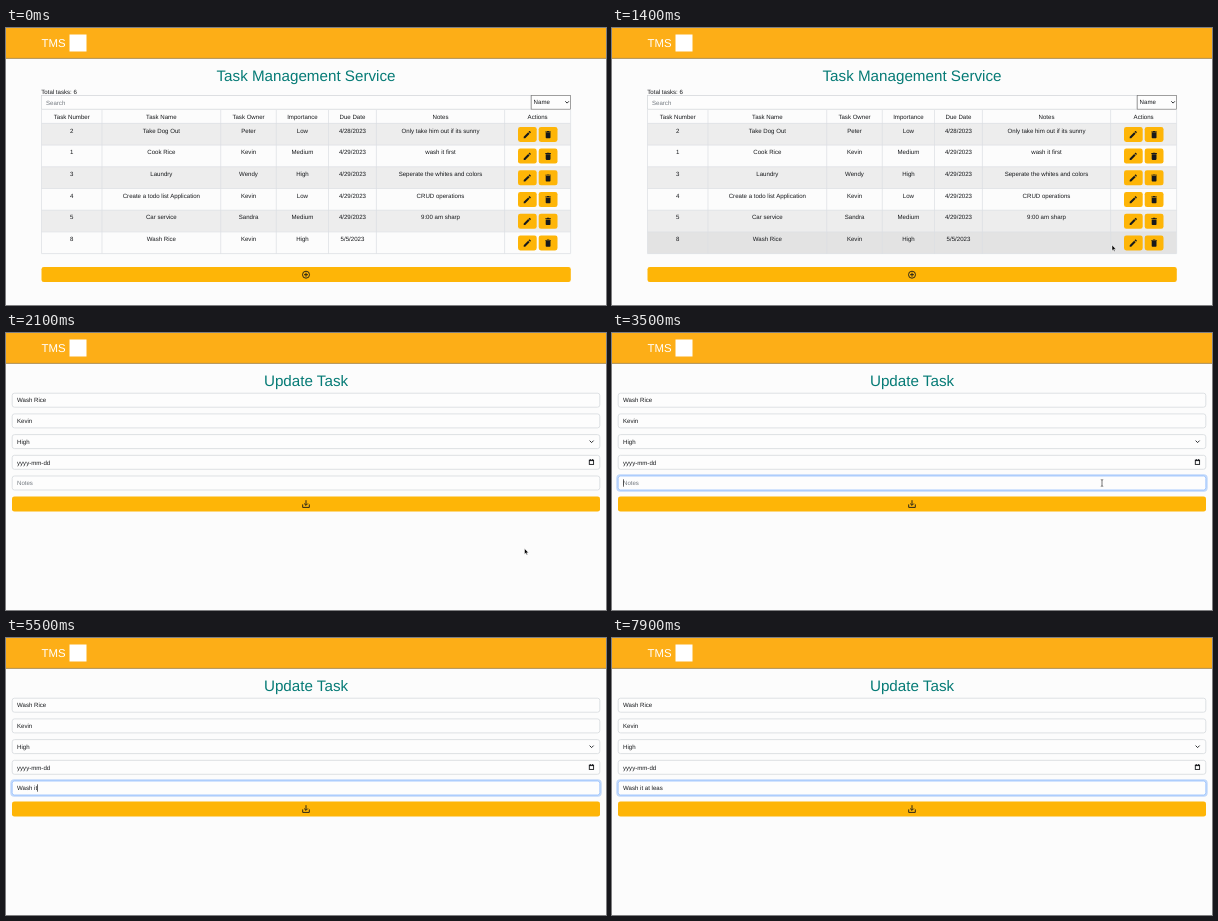
Animation of 600x277 px, one loop 8 s. Source, as an HTML page:

```html
<!DOCTYPE html>
<html lang="en">
<head>
<meta charset="utf-8">
<title>Task Management Service</title>
<style>
html, body { margin: 0; width: 100%; height: 100%; overflow: hidden; background: #fcfcfc; }
svg { display: block; }
text { font: 6.1px "Liberation Sans", Arial, sans-serif; fill: #17191c; white-space: pre; text-rendering: geometricPrecision; }
.mid { text-anchor: middle; }
.title { font-size: 15.2px; fill: #067b76; }
.brand { font-size: 11.4px; fill: #fff; }
.hint { fill: #747a80; }
.btn { fill: #feb507; }
.btn.hover { fill: #ffc832; }
.box { fill: #fdfdfd; stroke: #d0d4d8; stroke-width: .7; }
.line { fill: none; stroke: #17191c; stroke-width: .9; }
.grid { fill: none; stroke: #dcdfe2; stroke-width: .7; }
</style>
</head>
<body>
<svg id="stage" width="600" height="277" viewBox="0 0 600 277"></svg>
<script>
const LOOP = 8000, SUBMIT = 2100, FOCUS = 3300, HIDE = 4200, CARET_OFF = 7900;

const tasks = [
  [2, 'Take Dog Out', 'Peter', 'Low', '4/28/2023', 'Only take him out if its sunny'],
  [1, 'Cook Rice', 'Kevin', 'Medium', '4/29/2023', 'wash it first'],
  [3, 'Laundry', 'Wendy', 'High', '4/29/2023', 'Seperate the whites and colors'],
  [4, 'Create a todo list Application', 'Kevin', 'Low', '4/29/2023', 'CRUD operations'],
  [5, 'Car service', 'Sandra', 'Medium', '4/29/2023', '9:00 am sharp'],
  [8, 'Wash Rice', 'Kevin', 'High', '5/5/2023', '']
];
const heads = ['Task Number', 'Task Name', 'Task Owner', 'Importance', 'Due Date', 'Notes', 'Actions'];
const cols = [35.5, 96, 214.7, 270.3, 322.5, 370.4, 498.6, 564.6];
const TOP = 95.4, ROW = 21.7;

// [time, x, y] of the pointer tip
const path = [[400, 462, 236], [700, 475, 230], [800, 479.5, 225], [1200, 492, 219],
  [1600, 508, 215], [1900, 518.5, 215.5], [2600, 518.5, 215.5], [2800, 505, 185], [3000, 490, 150]];

// [time, contents of the notes field]
const typing = [[4300, 'W'], [4600, 'Wa'], [4700, 'Was'], [4800, 'Wash'], [5000, 'Wash '], [5200, 'Wash i'],
  [5400, 'Wash it'], [5700, 'Wash it '], [5800, 'Wash it a'], [6000, 'Wash it at'], [6200, 'Wash it at '],
  [6400, 'Wash it at l'], [6500, 'Wash it at le'], [6700, 'Wash it at lea'], [6900, 'Wash it at leas'],
  [7100, 'Wash it at least'], [7200, 'Wash it at least '], [7300, 'Wash it at least t'],
  [7500, 'Wash it at least'], [7600, 'Wash it at leas']];

const text = (x, y, s, cls = '', id = '') => `<text x="${x}" y="${y}" class="${cls}" id="${id}">${s}</text>`;
const rect = (x, y, w, h, cls, r = 0, id = '') =>
  `<rect x="${x}" y="${y}" width="${w}" height="${h}" rx="${r}" class="${cls}" id="${id}"/>`;
const line = d => `<path class="line" d="${d}"/>`;
const icon = (x, y, d) => `<path transform="translate(${x - 4.8} ${y - 4.8}) scale(.4)" fill="#17191c" d="${d}"/>`;
const pencil = 'M3 17.2V21h3.8L17.8 9.9 14.1 6.2zM20.7 7a1 1 0 0 0 0-1.4l-2.3-2.3a1 1 0 0 0-1.4 0l-1.9 1.8 3.8 3.8z';
const bin = 'M6 19a2 2 0 0 0 2 2h8a2 2 0 0 0 2-2V7H6zM19 4h-3.5l-1-1h-5l-1 1H5v2h14z';

function header() {
  return '<rect width="600" height="30" fill="#fdae17"/><rect y="29.9" width="600" height=".9" fill="#a9843f"/>' +
    text(35.5, 19.3, 'TMS', 'brand') + '<rect x="63.5" y="6.5" width="17" height="17" fill="#fff"/>';
}

function tableRow(task, i) {
  const y = TOP + i * ROW, last = i === tasks.length - 1;
  return `<rect id="${last ? 'lastRow' : ''}" x="35.5" y="${y}" width="529" height="${ROW}" fill="${i % 2 ? '#fcfcfc' : '#ededed'}"/>` +
    task.map((s, c) => text((cols[c] + cols[c + 1]) / 2, y + 9.1, s, 'mid')).join('') +
    rect(512, y + 3.5, 18.7, 15, 'btn', 2.3, last ? 'edit' : '') + icon(521.3, y + 11.2, pencil) +
    rect(532.7, y + 3.5, 18.8, 15, 'btn', 2.3) + icon(542.1, y + 11.2, bin);
}

function listPage() {
  const end = TOP + ROW * tasks.length;
  let grid = cols.map(x => `M${x} 82V${end}`).join('');
  for (let i = 0; i <= tasks.length; i++) grid += `M35.5 ${TOP + i * ROW}H564.6`;
  return text(300, 53.2, 'Task Management Service', 'title mid') + text(35.3, 66, 'Total tasks: 6') +
    rect(35.5, 67.4, 489.5, 13.8, 'box') + text(40, 76.6, 'Search', 'hint') +
    '<rect x="525.2" y="67.4" width="39.4" height="13.8" fill="#fdfdfd" stroke="#777" stroke-width=".7"/>' +
    text(527.6, 76.4, 'Name') + line('M559.3 73.3l1.8 1.8 1.8-1.8') +
    heads.map((s, c) => text((cols[c] + cols[c + 1]) / 2, 91, s, 'mid')).join('') +
    tasks.map(tableRow).join('') + `<path class="grid" d="${grid}"/>` +
    rect(35.5, 239, 529.3, 15, 'btn', 2.3) +
    '<circle class="line" cx="300" cy="246.7" r="3.5"/>' + line('M298 246.7h4M300 244.7v4');
}

function formPage() {
  const fields = ['Wash Rice', 'Kevin', 'High', 'yyyy-mm-dd', 'Notes'];
  return text(300, 53.2, 'Update Task', 'title mid') +
    '<rect id="ring" x="5.2" y="142.2" width="589.6" height="15.6" rx="3" fill="none" stroke="#c2d9fb" stroke-width="1.8"/>' +
    fields.map((s, i) => rect(6.2, 60.2 + i * 20.7, 587.6, 14, 'box', 2.3, i === 4 ? 'notesBox' : '') +
      text(11, 69.4 + i * 20.7, s, i === 4 ? 'hint' : '', i === 4 ? 'notes' : '')).join('') +
    line('M583.6 107.6l2 2 2-2') +
    '<rect class="line" x="583.3" y="127.2" width="4.3" height="4.2"/>' + line('M583 127.6h5M584.3 126v1.5M586.6 126v1.5') +
    rect(6, 163.5, 588, 15, 'btn', 2.3, 'save') +
    line('M300 167.2v5M298.1 170.5l1.9 1.9 1.9-1.9M296.7 171.4v3h6.6v-3') +
    '<rect id="caret" y="146.3" width=".6" height="7.4"/>';
}

const cursors = {
  arrow: '<path d="M0 0v5.7l1.3-1.2 .9 2 .9-.4-.9-1.9h1.8z" stroke="#fff" stroke-width=".5"/>',
  hand: '<path d="M0 .3c.6-.5 1 0 1 .5v1.8l2 .4c.6.1.9.5.8 1.1l-.5 2.6H.6L-1.2 4.3c.2-.6.7-.5 1.2 0z" fill="#fff" stroke="#111" stroke-width=".6"/>',
  beam: '<path d="M-1.2-3.4q1.2 0 1.2.8v5.2q0 .8-1.2.8M1.2-3.4Q0-3.4 0-2.6M1.2 3.4Q0 3.4 0 2.6" fill="none" stroke="#222" stroke-width=".6"/>'
};

const $ = id => document.getElementById(id);
$('stage').innerHTML = header() + `<g id="list">${listPage()}</g><g id="form">${formPage()}</g><g id="pointer"></g>`;

const show = (id, on) => $(id).setAttribute('visibility', on ? 'visible' : 'hidden');
const within = (v, a, b) => v >= a && v <= b;

function pointerAt(t) {
  const i = path.findIndex(p => p[0] > t);
  if (i < 0) return path[path.length - 1].slice(1);
  if (i === 0) return [-20, -20];
  const [t0, x0, y0] = path[i - 1], [t1, x1, y1] = path[i], k = (t - t0) / (t1 - t0);
  return [x0 + (x1 - x0) * k, y0 + (y1 - y0) * k];
}

function draw(now) {
  const t = Math.floor(now % LOOP / 100) * 100;
  const form = t >= SUBMIT, focused = t >= FOCUS;
  const [x, y] = pointerAt(t);
  const onEdit = !form && within(x, 512, 531) && within(y, 207, 222);
  const onSave = form && t < HIDE && within(y, 163.5, 178.5);
  const onNotes = form && within(y, 143, 157);

  $('list').style.display = form ? 'none' : '';
  $('form').style.display = form ? '' : 'none';
  $('lastRow').setAttribute('fill', within(y, 203, 225.6) ? '#e3e3e3' : '#fcfcfc');
  $('edit').classList.toggle('hover', onEdit);
  $('save').classList.toggle('hover', onSave);

  $('ring').style.opacity = Math.max(0, Math.min(1, (t - FOCUS + 50) / 150));
  $('notesBox').style.stroke = focused ? '#86b7fe' : '';
  const typed = typing.reduce((s, [at, v]) => t >= at ? v : s, '');
  $('notes').textContent = typed || 'Notes';
  $('notes').classList.toggle('hint', !typed);
  if (form) $('caret').setAttribute('x', 11.1 + (typed ? $('notes').getComputedTextLength() : 0));
  $('caret').style.display = focused && t < CARET_OFF ? '' : 'none';

  show('pointer', t >= path[0][0] && t < HIDE);
  $('pointer').setAttribute('transform', `translate(${x} ${y})`);
  $('pointer').innerHTML = cursors[onEdit || onSave ? 'hand' : onNotes ? 'beam' : 'arrow'];
}

const start = performance.now();
function tick() {
  draw(performance.now() - start);
  requestAnimationFrame(tick);
}
tick();
</script>
</body>
</html>
```
